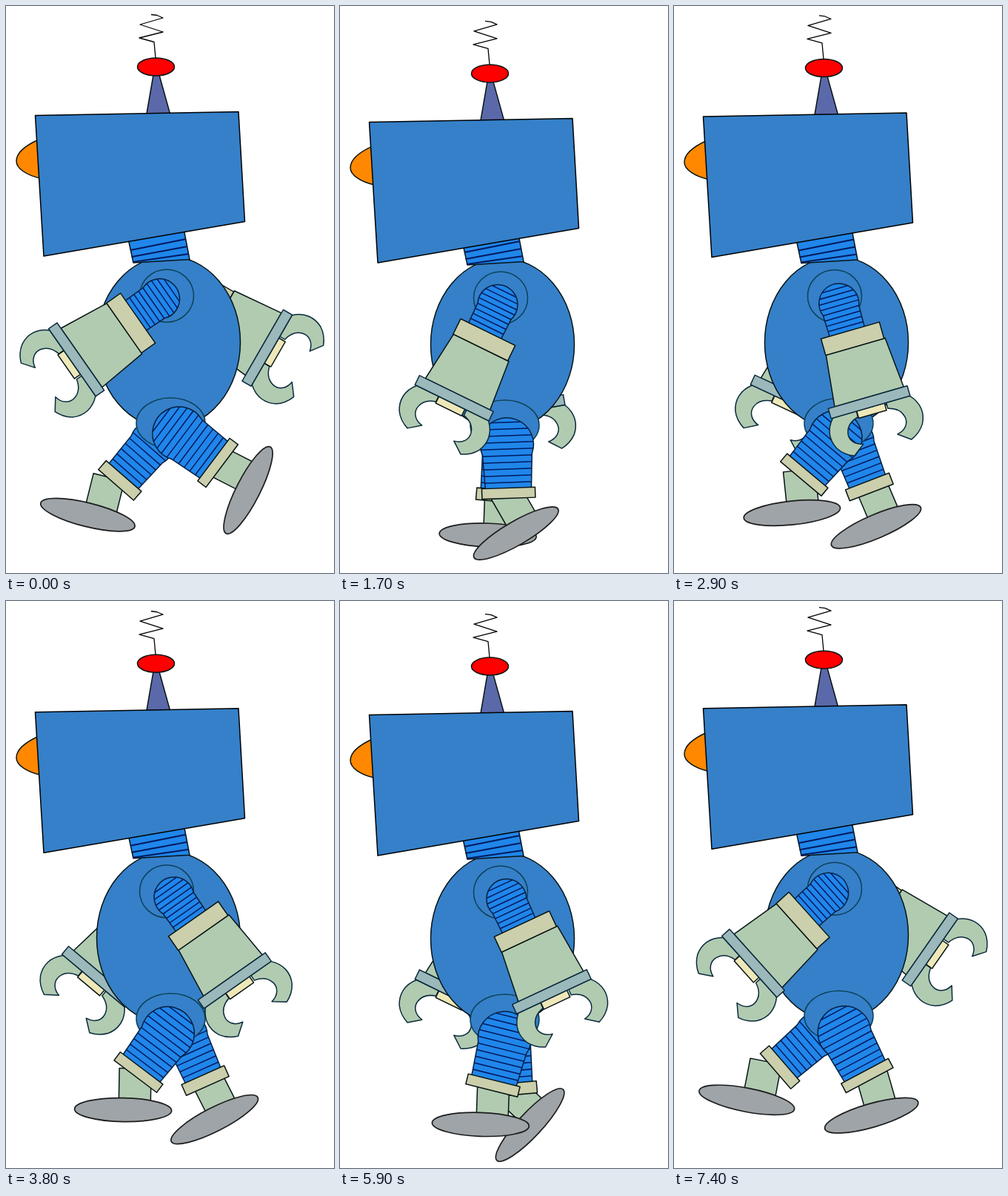
Write an HTML page with a canvas that moves like this. It is 443x764 px and loops after 7500 ms.

```html
<!DOCTYPE html>
<html>
<head>
<meta charset="utf-8">
<style>
html, body { margin: 0; width: 100%; height: 100%; overflow: hidden; background: #fff; }
canvas { display: block; }
</style>
</head>
<body>
<canvas id="stage" width="443" height="764"></canvas>
<script>
const ctx = document.getElementById('stage').getContext('2d');
const LOOP = 7500, STEP = 100, RAD = Math.PI / 180;
const BLUE = '#3580c9', RING = '#2086ea', GREEN = '#b1cbb1', CREAM = '#cbcfab';
const STEEL = '#9bb8bb', DARK = '#081414', NAVY = '#001a5e', TEAL = '#0d4258';

// Key poses in degrees; every joint position follows from these angles.
const POSE_TIMES = [0, 1700, 2900, 3800, 4800, 5900, 7400];
const POSES = {
  nearArm: [55, 26, -16, -35, -42, -25, 48],
  farArm: [-60, -10, 25, 40, 49, 26, -55],
  nearLeg: [-53, -2, 40, 37, 32, 14, -28],
  nearFoot: [-63, -30, -6, 1, 7, 2, -16],
  farLeg: [41, 5, -21, -24, -36, -5, 49],
  farFoot: [14, 2, -23, -27, -49, -47, 11],
};
const BOB_TIMES = [0, 1250, 3250, 5250, 7200];
const BOBS = [0, 10, .8, 9, -2.8];

const linear = k => k;
const smooth = k => (1 - Math.cos(Math.PI * k)) / 2;

function at(times, values, t, ease) {
  let i = 1;
  while (i < times.length - 1 && times[i] < t) i++;
  const k = Math.min(1, (t - times[i - 1]) / (times[i] - times[i - 1]));
  return values[i - 1] + (values[i] - values[i - 1]) * ease(k);
}

function paint(path, fill, line = DARK, width = 1.5) {
  if (fill) { ctx.fillStyle = fill; ctx.fill(path); }
  ctx.strokeStyle = line;
  ctx.lineWidth = width;
  ctx.stroke(path);
}

const poly = (...p) => new Path2D('M' + p.join(' ') + 'Z');
const box = (x0, y0, x1, y1) => poly(x0, y0, x1, y0, x1, y1, x0, y1);

function oval(x, y, rx, ry) {
  const p = new Path2D();
  p.ellipse(x, y, rx, ry, 0, 0, 7);
  return p;
}

function placed(x, y, degrees, draw) {
  ctx.save();
  ctx.translate(x, y);
  ctx.rotate(degrees * RAD);
  draw();
  ctx.restore();
}

// Ribbed limb: round top, straight sides down to (±w, len)
function limb(r, w, len, gap) {
  const p = new Path2D();
  p.arc(0, 0, r, Math.PI * .88, Math.PI * 2.12);
  p.lineTo(w, len);
  p.lineTo(-w, len);
  p.closePath();
  ctx.save();
  ctx.clip(p);
  ctx.fillStyle = RING;
  ctx.fill(p);
  for (let y = len - gap; y > -r; y -= gap) paint(new Path2D(`M${-r} ${y}H${r}`), null, NAVY);
  ctx.restore();
  paint(p, null, '#06203f');
}

const claw = new Path2D('M-54 146C-66 159-67 174-60 187Q-53 198-40 203L-24 191C-36 189-42 180-40 171Q-37 158-21 154V146Z');

function arm(a, bob) {
  const x = 219 - 14 * Math.sin(a * RAD), y = 386 + 15 * Math.cos(a * RAD) + bob;
  placed(x, y, a, () => {
    limb(27, 24.5, 40, 7.5);
    ctx.save();
    ctx.translate(3.5, 0);
    for (const side of [1, -1]) {
      ctx.scale(side, 1);
      paint(claw, GREEN, '#0b2a3c');
    }
    ctx.restore();
    paint(box(-17, 146, 22, 156), '#eee8b9');
    paint(poly(-36, 62, 47, 62, 53, 132, -44, 132), GREEN);
    paint(box(-36.5, 39, 45.5, 62), CREAM);
    paint(box(-53, 132, 58, 146), STEEL, '#0b2a3c');
  });
}

const nearBuild = { hip: [225, 558], sway: 11, drop: 30, tilt: 0, lunge: 0, r: 36, w: 31, cuff: 36, thick: 14 };
const farBuild = { hip: [225, 565], sway: 42, drop: 25, tilt: 8, lunge: 15, r: 30, w: 26, cuff: 31.5, thick: 16 };

function leg(a, footAngle, b, bob) {
  const s = Math.sin(a * RAD), c = Math.cos(a * RAD), stretch = b.lunge * Math.max(0, s);
  placed(b.hip[0] - b.sway * s, b.hip[1] + b.drop * c + b.tilt * s + bob, a, () => {
    placed(-stretch, 79 + stretch, footAngle - a, () => {
      paint(box(-18, -16, 25, 32), GREEN);
      paint(oval(-12, 40, 65.5, 16), '#9ea4a7', '#1c1c1c', 1.7);
    });
    limb(b.r, b.w, 60, 9);
    paint(box(-b.cuff, 58.5, b.cuff, 58.5 + b.thick), CREAM);
  });
}

function torso() {
  paint(oval(219.5, 453, 97, 116), BLUE);
  paint(oval(222.5, 562, 46.5, 34), BLUE, TEAL);
  paint(oval(217, 390.5, 36.5, 35.5), BLUE, TEAL);
}

function neck() {
  paint(poly(162, 300, 240, 300, 248, 341.5, 172, 346), RING);
  paint(new Path2D('M168 329L243 314M169.5 338L245 324M171 345L247 334'), null, NAVY, 2);
}

function head() {
  paint(new Path2D('M44 180C24 189 14 199 14 209C14 219 28 228 46 232Z'), '#ff8800');
  paint(poly(199, 93, 207, 93, 221.5, 145, 190, 145), '#5b69aa');
  paint(oval(202.5, 82, 25, 12), '#fe0000');
  paint(new Path2D('M196 11.5L204 12.5L212 16L181 25L212 35L180 43L200 48.5L202 70'), null, '#000', 1.3);
  paint(poly(39.5, 147.5, 314, 142.5, 322.5, 290.5, 51, 337), BLUE, '#000');
}

function frame(now) {
  const t = Math.floor(now % LOOP / STEP) * STEP;
  const headBob = at(BOB_TIMES, BOBS, t, smooth);
  const bob = Math.min(headBob, headBob * .33);
  const pose = name => at(POSE_TIMES, POSES[name], t, linear);
  ctx.fillStyle = '#fff';
  ctx.fillRect(0, 0, 443, 764);
  ctx.lineJoin = 'round';
  arm(pose('farArm'), bob);
  leg(pose('farLeg'), pose('farFoot'), farBuild, bob);
  placed(0, bob, 0, torso);
  leg(pose('nearLeg'), pose('nearFoot'), nearBuild, bob);
  arm(pose('nearArm'), bob);
  placed(0, bob, 0, neck);
  placed(0, headBob, 0, head);
  requestAnimationFrame(frame);
}
requestAnimationFrame(frame);
</script>
</body>
</html>
```
